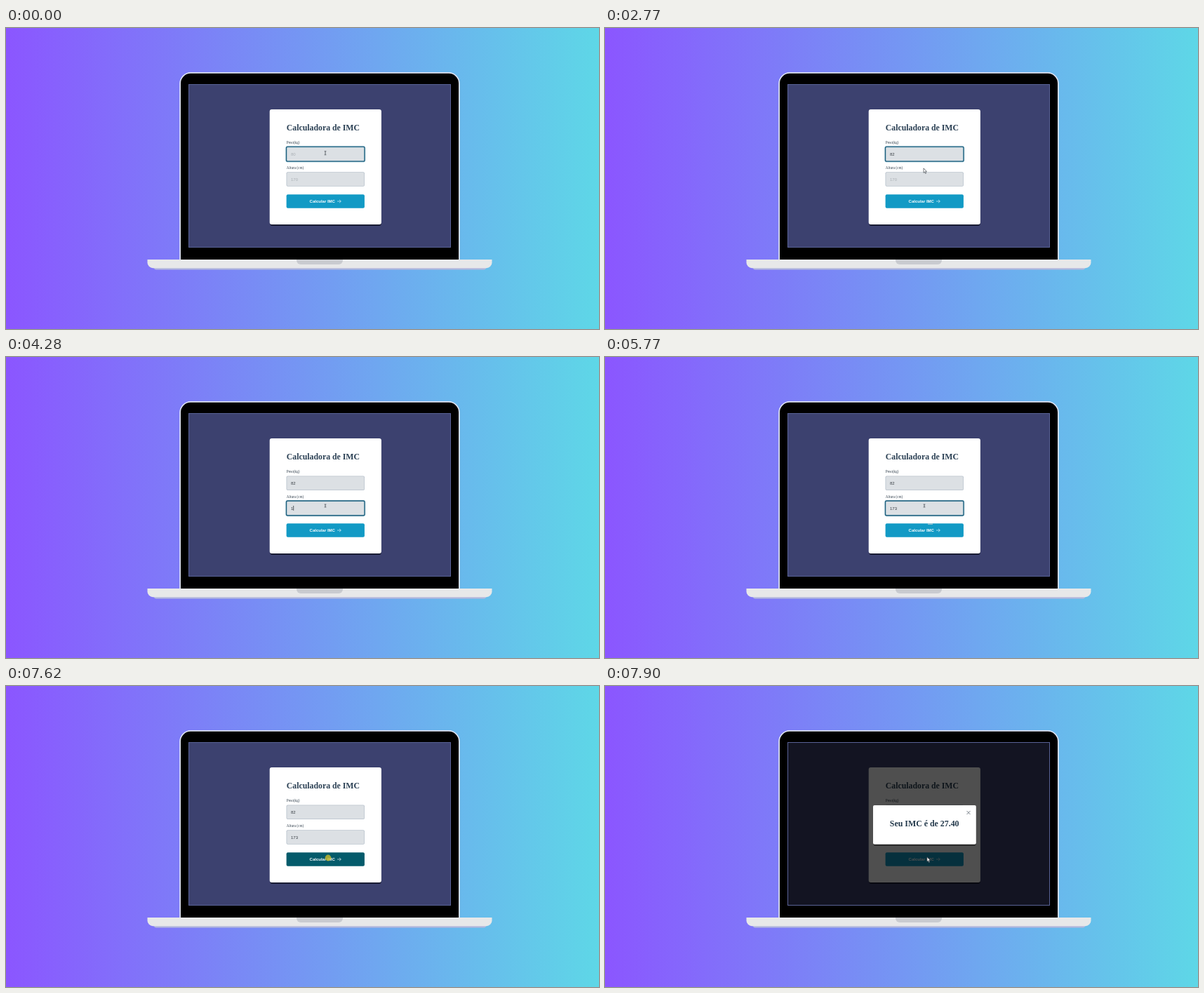
These frames come from a looping animation (845 px wide and 429 px high, 8 s). An HTML page with a canvas:

```html
<!DOCTYPE html>
<html lang="pt-BR">
<head>
<meta charset="utf-8">
<title>Calculadora de IMC</title>
<style>
html, body { margin: 0; width: 100%; height: 100%; overflow: hidden; background: #749af3; }
canvas { display: block; width: 845px; height: 429px; }
</style>
</head>
<body>
<canvas id="stage" width="845" height="429"></canvas>
<script>
const ctx = document.getElementById('stage').getContext('2d');
const LOOP = 8000;
const SERIF = '"Liberation Serif", serif';
const SANS = '"Liberation Sans", sans-serif';

const within = (t, a, b) => t >= a && t < b;
const clamp = v => Math.max(0, Math.min(1, v));
const lerp = (a, b, k) => a + (b - a) * k;
const progress = (t, a, b) => clamp((t - a) / (b - a));
const step = (t, start) => start + Math.floor((t - start) / 70) * 70;

function mix(a, b, k) {
  return `rgb(${a.map((v, i) => Math.round(lerp(v, b[i], k))).join(',')})`;
}

function box(x, y, w, h, r, fill) {
  ctx.beginPath();
  ctx.roundRect(x, y, w, h, r);
  ctx.fillStyle = fill;
  ctx.fill();
}

function text(str, x, y, font, color) {
  ctx.font = font;
  ctx.fillStyle = color;
  ctx.fillText(str, x, y);
}

function line(points, color, width) {
  ctx.beginPath();
  points.forEach(([x, y]) => ctx.lineTo(x, y));
  ctx.strokeStyle = color;
  ctx.lineWidth = width;
  ctx.stroke();
}

function laptop() {
  const sky = ctx.createLinearGradient(0, 0, 845, 0);
  sky.addColorStop(0, '#8b56ff');
  sky.addColorStop(1, '#5ed7e7');
  ctx.fillStyle = sky;
  ctx.fillRect(0, 0, 845, 429);

  box(247.3, 63, 399.4, 268, [16, 16, 0, 0], '#dfe4f4');
  box(249, 64.8, 396, 266, [14, 14, 0, 0], '#000');
  box(211, 341, 473, 3.5, [0, 0, 3, 3], '#b3b8dc');
  box(201.5, 330, 491, 12.2, [0, 0, 8, 8], '#e7e8e9');
  box(414, 330, 66, 7, [0, 0, 6, 6], '#c9cbd0');
  ctx.fillStyle = '#3c416f';
  ctx.fillRect(260, 80, 374, 233);
}

function screenEdge() {
  ctx.strokeStyle = '#596296';
  ctx.lineWidth = 1;
  ctx.strokeRect(260.5, 80.5, 373, 232);
}

function field(y, focus, value, hint, caret) {
  box(399.5, y, 111.5, 20.5, 2, '#b9c3cd');
  box(400.3, y + 0.7, 110, 19, 1.5, '#dce0e4');
  if (focus) {
    ctx.beginPath();
    ctx.roundRect(399.4, y - 0.3, 111.7, 21, 2);
    ctx.strokeStyle = 'rgba(60,160,195,.3)';
    ctx.lineWidth = 2.4;
    ctx.stroke();
    ctx.strokeStyle = '#215f7c';
    ctx.lineWidth = 1.3;
    ctx.stroke();
  }
  const font = '6px ' + SANS;
  text(value || hint, 406, y + 12.4, font, value ? '#353b41' : '#a9afb4');
  if (caret) {
    ctx.fillStyle = '#30363c';
    ctx.fillRect(406 + ctx.measureText(value).width, y + 6.7, 0.8, 6.8);
  }
}

function button(t) {
  const base = [18, 154, 197], hover = [6, 104, 124], press = [4, 91, 107];
  let color = mix(base, hover, progress(step(t, 5840), 5910, 6330));
  if (t >= 7480) color = mix(hover, press, progress(t, 7410, 7600));
  if (t >= 7690) color = mix(base, base, 0);
  box(399.6, 237.2, 111.3, 19.6, 2, color);
  text('Calcular IMC', 432.6, 249.2, 'bold 6px ' + SANS, '#fff');
  line([[472, 247], [477.3, 247]], '#fff', 0.6);
  line([[475, 244.8], [477.3, 247], [475, 249.2]], '#fff', 0.6);
}

function card(t) {
  box(376.3, 118, 158.4, 164, 3, 'rgba(18,20,38,.8)');
  box(375.7, 116, 159.2, 164, 3, '#fff');
  text('Calculadora de IMC', 399.8, 145.6, 'bold 11.8px ' + SERIF, '#2b4054');
  text('Peso(kg)', 399.8, 165, '5.3px ' + SERIF, '#33414e');
  text('Altura (cm)', 399.8, 200.5, '5.2px ' + SERIF, '#33414e');

  const weight = t < 1420 ? '' : t < 1820 ? '8' : '82';
  const height = t < 4280 ? '' : t < 4550 ? '1' : t < 4890 ? '17' : '173';
  const caretA = within(t, 70, 600) || within(t, 1140, 2350) || within(t, 2880, 3050);
  const caretB = within(t, 3190, 3740) || within(t, 4280, 5490) ||
    within(t, 6020, 6540) || within(t, 7080, 7480);
  field(169.5, t < 3120, weight, '80', caretA);
  field(205.3, within(t, 3120, 7480), height, '170', caretB);
  button(t);
}

function modal() {
  ctx.fillStyle = 'rgba(0,0,0,.69)';
  ctx.fillRect(260, 80, 374, 233);
  box(382.5, 172, 146, 55.6, 2, 'rgba(0,0,0,.65)');
  box(382, 170, 146.8, 55.8, 2, '#fff');
  text('Seu IMC é de 27.40', 405.8, 199.5, 'bold 11.9px ' + SERIF, '#22384a');
  line([[515.5, 178], [520.5, 183]], '#59636c', 0.8);
  line([[520.5, 178], [515.5, 183]], '#59636c', 0.8);
}

function beam(x, y, h) {
  const c = '#4b5158';
  line([[x, y - h], [x, y + h]], c, 0.9);
  line([[x - 1.4, y - h], [x + 1.4, y - h]], c, 0.7);
  line([[x - 1.4, y + h], [x + 1.4, y + h]], c, 0.7);
}

function shape(x, y, points, fill, edge) {
  ctx.beginPath();
  points.forEach(([dx, dy]) => ctx.lineTo(x + dx, y + dy));
  ctx.closePath();
  ctx.fillStyle = fill;
  ctx.fill();
  ctx.strokeStyle = edge;
  ctx.lineWidth = 0.7;
  ctx.stroke();
}

const arrow = (x, y) => shape(x, y,
  [[0, 0], [0, 6.5], [1.5, 5.2], [2.6, 7.6], [3.6, 7.1], [2.6, 4.8], [4.3, 4.6]], '#fff', '#3f454c');

const hand = (x, y, s) => shape(x, y,
  [[0, 0], [1, 0], [1.2, 2.6], [4, 3.3], [4.2, 5], [3.5, 8], [0.6, 8], [-1.8, 5.1], [-1, 4.4], [0, 5]]
    .map(([a, b]) => [a * s, b * s]), '#fff', '#123f4b');

function clickDot(x, y) {
  ctx.beginPath();
  ctx.arc(x, y, 4.4, 0, Math.PI * 2);
  ctx.fillStyle = 'rgba(198,186,45,.82)';
  ctx.fill();
}

function pointer(t) {
  if (t < 2630) {
    beam(455, 178.2, 2.6);
  } else if (t < 5840) {
    const y = lerp(178.2, 212, progress(step(t, 2630), 2550, 2910));
    if (y < 190) beam(455, y, 2.6);
    else if (y < 206) arrow(454, y + 1);
    else beam(455, y, 2);
    if (within(t, 3050, 3190)) clickDot(455, 212);
    if (t >= 5770) {
      ctx.fillStyle = 'rgba(190,205,212,.7)';
      ctx.fillRect(460, 237.3, 7, 1.7);
    }
  } else if (t < 7690) {
    const k = progress(step(t, 5840), 5770, 6050);
    const x = lerp(455, 459, k), y = lerp(212, 244.5, k);
    if (within(t, 7480, 7690)) clickDot(459, 245);
    else if (y < 225) beam(x, y, 2);
    else if (y < 236) arrow(x, y);
    else hand(x, y, 1);
  } else {
    arrow(459, 243.8);
  }
}

function draw(t) {
  laptop();
  card(t);
  if (t >= 7690) modal();
  screenEdge();
  pointer(t);
}

const start = performance.now();
function tick() {
  draw((performance.now() - start) % LOOP);
  requestAnimationFrame(tick);
}
tick();
</script>
</body>
</html>
```
